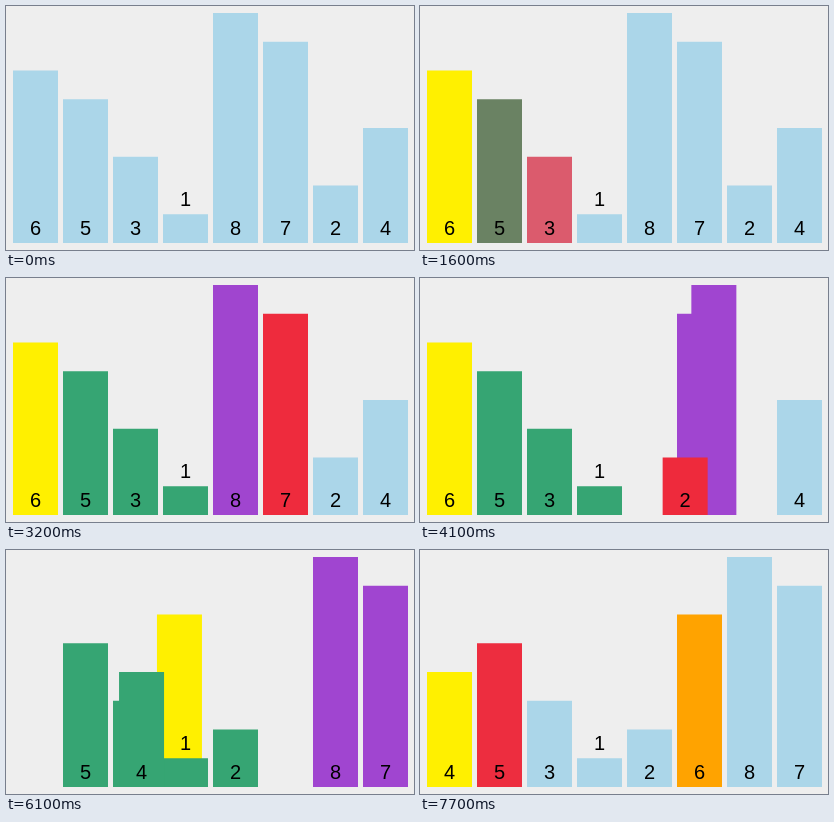
An HTML page that plays this animation: 408 by 244 pixels, repeating every 8000 ms.

```html
<!DOCTYPE html>
<html lang="en">
<head>
<meta charset="utf-8">
<title>Quicksort partition</title>
<style>
html, body { margin: 0; width: 100%; height: 100%; overflow: hidden; background: #eee; }
svg { display: block; }
text { font: 20px Helvetica, Arial, "Liberation Sans", sans-serif; text-anchor: middle; }
</style>
</head>
<body>
<svg id="stage" width="408" height="244"></svg>
<script>
const LOOP = 8000, TICK = 100, PERIOD = 502, LEAD = 82, DURATION = 300;
const SLOT = 50, LEFT = 7, BASE = 237, WIDTH = 45, UNIT = 28.75;
const BLUE = [171, 214, 233], YELLOW = [255, 240, 0], RED = [238, 42, 60],
      GREEN = [54, 165, 115], PURPLE = [160, 69, 208], ORANGE = [255, 163, 0];
const values = [6, 5, 3, 1, 8, 7, 2, 4];

const paint = (...pairs) => bars => pairs.forEach(([v, color]) => bars[v].color = color);
const swap = (a, b) => bars => {
  [bars[a].slot, bars[b].slot] = [bars[b].slot, bars[a].slot];
};

// One step about every half second; bars are named by their value.
const steps = [
  paint([6, YELLOW]),
  paint([5, RED]),
  paint([5, GREEN], [3, RED]),
  paint([3, GREEN], [1, RED]),
  paint([1, GREEN], [8, RED]),
  paint([8, PURPLE], [7, RED]),
  paint([7, PURPLE], [2, RED]),
  swap(8, 2),
  paint([2, GREEN], [4, RED]),
  swap(7, 4),
  paint([4, GREEN]),
  swap(6, 4),
  paint(...values.map(v => [v, v === 6 ? ORANGE : BLUE])),
  paint([4, YELLOW]),
  paint([5, RED])
];

const copy = bars => Object.fromEntries(values.map(v => [v, { ...bars[v] }]));
const states = [Object.fromEntries(values.map((v, slot) => [v, { slot, color: BLUE }]))];
for (const step of steps) {
  const next = copy(states[states.length - 1]);
  step(next);
  states.push(next);
}

const svg = document.getElementById("stage");
function add(parent, tag, attrs) {
  const el = document.createElementNS("http://www.w3.org/2000/svg", tag);
  for (const key in attrs) el.setAttribute(key, attrs[key]);
  return parent.appendChild(el);
}

const groups = values.map(v => {
  const g = add(svg, "g", {});
  const height = v * UNIT;
  const rect = add(g, "rect", { y: BASE - height, width: WIDTH, height });
  const y = v === 1 ? 200 : 229;
  add(g, "text", { x: WIDTH / 2, y }).textContent = v;
  return { v, g, rect };
});

const ease = p => p < 0.5 ? 4 * p ** 3 : 1 - 4 * (1 - p) ** 3;
const mix = (a, b, p) => a + (b - a) * p;

function draw(time) {
  const t = Math.floor(time % LOOP / TICK) * TICK;
  const k = Math.min(steps.length, Math.max(0, Math.floor((t + LEAD) / PERIOD)));
  const p = ease(Math.min(1, (t + LEAD - k * PERIOD) / DURATION));
  const from = states[Math.max(0, k - 1)], to = states[k];
  for (const { v, g, rect } of groups) {
    const a = from[v], b = to[v];
    g.setAttribute("transform", `translate(${LEFT + SLOT * mix(a.slot, b.slot, p)})`);
    rect.setAttribute("fill", `rgb(${a.color.map((c, i) => Math.round(mix(c, b.color[i], p)))})`);
  }
}

function frame() {
  draw(performance.now());
  requestAnimationFrame(frame);
}
frame();
</script>
</body>
</html>
```
